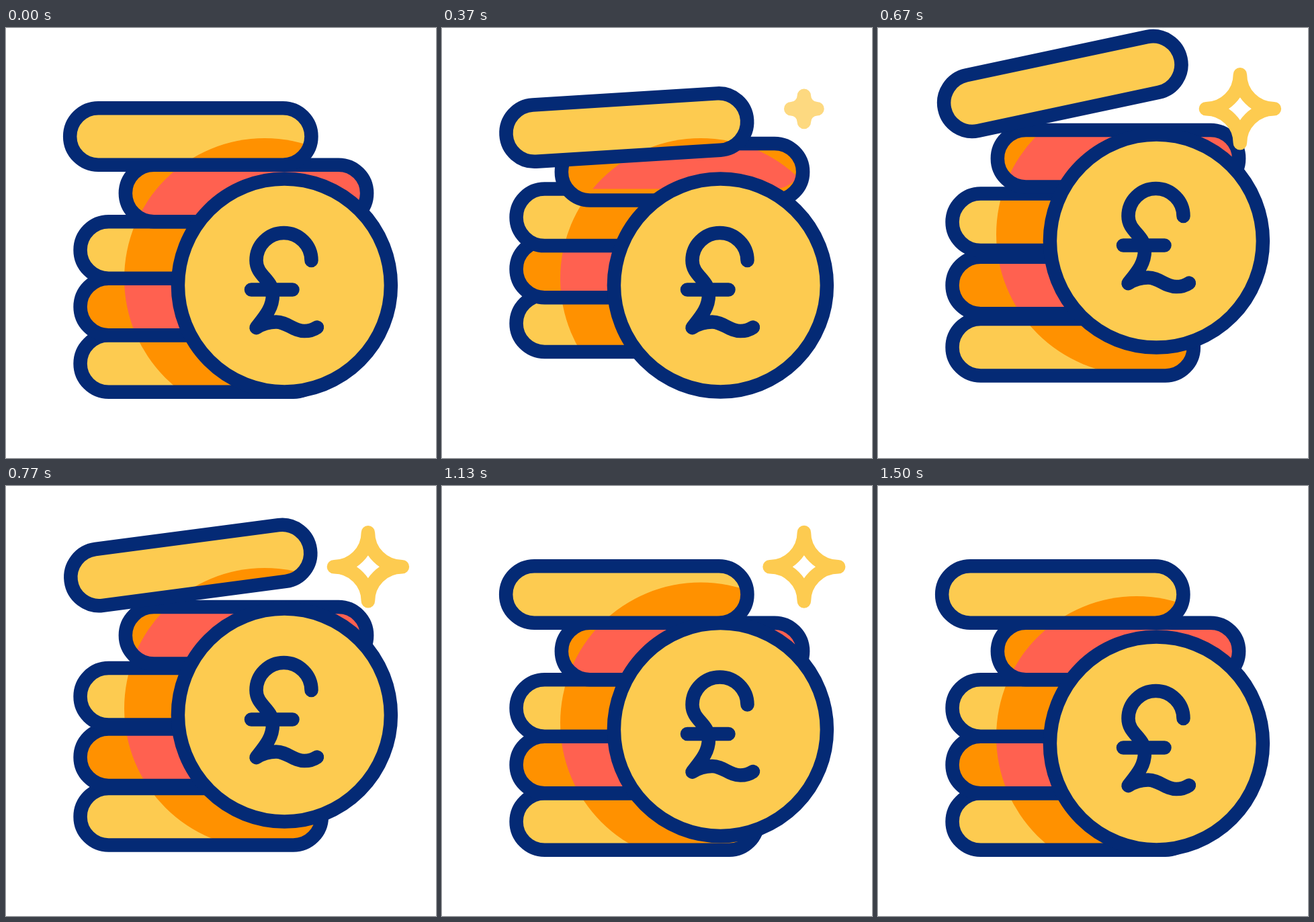
Recreate the animation shown at these times as an HTML page with a canvas. Size 640 px wide and 640 px high, loop 2 s.

```html
<!DOCTYPE html>
<html lang="en">
<head>
<meta charset="utf-8">
<title>Coins</title>
<style>
  html, body { margin: 0; width: 100%; height: 100%; overflow: hidden; background: #fff; }
  canvas { display: block; width: 640px; height: 640px; }
</style>
</head>
<body>
<canvas id="stage"></canvas>
<script>
const LOOP = 2000;
const NAVY = '#042a75', YELLOW = '#fdcb50', ORANGE = '#ff9100', RED = '#ff6150';
const LINE = 20.5, PILL_W = 359.3, PILL_H = 84.5;
const TOP = 4;

const canvas = document.getElementById('stage');
const ctx = canvas.getContext('2d');
const dpr = window.devicePixelRatio || 1;
canvas.width = canvas.height = 640 * dpr;

const ramp = (t, from, to) => Math.min(1, Math.max(0, (t - from) / (to - from)));
const ease = (t, from, to) => {
  const p = ramp(t, from, to);
  return p * p * (3 - 2 * p);
};

// Pills count from the bottom (0) to the top (4); each one starts and lands a bit later.
const shifts = [0, 0, 0, 67.3, -15.4];
const starts = [0, 30, 95, 212, 304];

function lift(i, t) {
  const height = i === TOP ? 79 : 61;
  const up = ease(t, starts[i], 405 + 39 * i);
  const down = ease(t, 410 + 62 * i, Math.min(900, 870 + 14 * i));
  return -height * (up - down);
}

// Rises steadily, drops back, then settles through the last degree.
const tilt = t =>
  -12 * ramp(t, 245, 670) + 11 * ease(t, 670, 900) + ease(t, 900, 1115);

// One big hop and a small bounce.
const hop = t =>
  -66 * (ease(t, 410, 667) - ease(t, 667, 922)) -
  20.5 * (ease(t, 922, 1130) - ease(t, 1130, 1340));

function pillPath(i, y, angle) {
  const shape = new Path2D();
  shape.roundRect(-PILL_W / 2, -PILL_H / 2, PILL_W, PILL_H, PILL_H / 2);
  const path = new Path2D();
  path.addPath(shape, new DOMMatrix()
    .translate(290.2 + shifts[i], 499.5 - 84.53 * i + y)
    .rotate(angle));
  return path;
}

function disc(x, y, r, color) {
  ctx.beginPath();
  ctx.arc(x, y, r, 0, Math.PI * 2);
  ctx.fillStyle = color;
  ctx.fill();
}

function drawPill(i, t, coinY) {
  const odd = i % 2 === 1;
  const angle = i === TOP ? tilt(t) : 0;
  const path = pillPath(i, lift(i, t), angle);
  ctx.fillStyle = odd ? ORANGE : YELLOW;
  ctx.fill(path);

  // The red shade keeps pace with the pill below its own.
  ctx.save();
  ctx.clip(path);
  if (odd) ctx.clip(pillPath(i, lift(i - 1, t), 0));
  disc(385, 373 + coinY, 209, odd ? RED : ORANGE);
  ctx.restore();

  ctx.stroke(path);
}

const pound = new Path2D(
  'M454.5 346A41 41 0 0 0 372.5 346C372.5 369 397 374 397 397' +
  'C397 417 385 430 372.5 446C382 440 392 437.5 402 437.5' +
  'C418 437.5 428 451 444 451C451 451 458 449 463 445.5' +
  'M365 389.5H426.5');

function drawCoin(y) {
  ctx.save();
  ctx.translate(0, y);
  disc(414.4, 383, 158.5, YELLOW);
  ctx.stroke();
  ctx.stroke(pound);
  ctx.restore();
}

// The spark leaves as it came, so time is folded around its middle.
function drawSpark(t) {
  const u = 893 - Math.abs(t - 893);
  const r = 67.5 * ease(u, 290, 517) - 16.5 * ease(u, 517, 667);
  if (r <= 0) return;
  ctx.save();
  ctx.translate(538.9, 120.3);
  ctx.globalAlpha = ramp(u, 270, 410);
  ctx.strokeStyle = YELLOW;
  ctx.beginPath();
  for (let k = 0; k < 4; k++) {
    const a = k * Math.PI / 2;
    const mid = a + Math.PI / 4;
    ctx.moveTo(r * Math.cos(a + Math.PI / 2), r * Math.sin(a + Math.PI / 2));
    ctx.arc(r * Math.SQRT2 * Math.cos(mid), r * Math.SQRT2 * Math.sin(mid), r,
      a + Math.PI, a + Math.PI * 1.5);
  }
  ctx.stroke();
  ctx.restore();
}

function draw(t) {
  ctx.setTransform(dpr, 0, 0, dpr, 0, 0);
  ctx.fillStyle = '#fff';
  ctx.fillRect(0, 0, 640, 640);
  ctx.lineWidth = LINE;
  ctx.lineCap = ctx.lineJoin = 'round';
  ctx.strokeStyle = NAVY;

  const coinY = hop(t);
  for (let i = 0; i <= TOP; i++) drawPill(i, t, coinY);
  drawCoin(coinY);
  drawSpark(t);
}

const start = performance.now();
function tick() {
  draw((performance.now() - start) % LOOP);
  requestAnimationFrame(tick);
}
tick();
</script>
</body>
</html>
```
